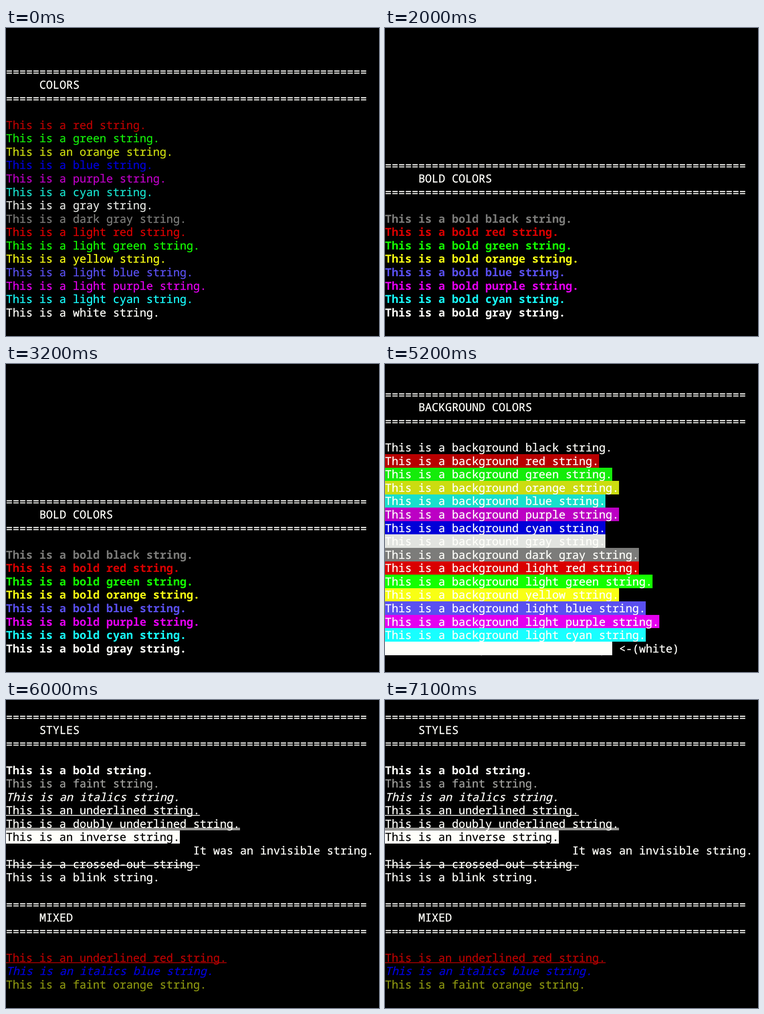
Write an HTML page that moves like this. It is 824 px wide and 680 px high and loops after 7700 ms.

```html
<!DOCTYPE html>
<html lang="en">
<head>
<meta charset="utf-8">
<title>Terminal text styles</title>
<style>
  html, body { margin: 0; width: 100%; height: 100%; overflow: hidden; background: #000; }
  svg { display: block; width: 824px; height: 680px; }
  text {
    font: 24.617px "Noto Sans Mono", "DejaVu Sans Mono", monospace;
    text-rendering: geometricPrecision;
    white-space: pre;
    fill: currentColor;
    stroke: currentColor;
    stroke-width: .35px;
  }
  .bold { font-weight: 700; stroke: none; }
  .italic { font-style: italic; }
  .screen, .blink { animation: 7.7s step-end infinite; }
  #colors { animation-name: colors; }
  #bold { animation-name: bold; }
  #backs { animation-name: backs; }
  #styles { animation-name: styles; }
  .blink { animation-name: blink; }
  /* switches at 2 s, 4 s and 6 s; the blink gap runs from 7 s to 7.1 s */
  @keyframes colors { 0% { opacity: 1 } 25.974%, 100% { opacity: 0 } }
  @keyframes bold { 0% { opacity: 0 } 25.974% { opacity: 1 } 51.948%, 100% { opacity: 0 } }
  @keyframes backs { 0% { opacity: 0 } 51.948% { opacity: 1 } 77.922%, 100% { opacity: 0 } }
  @keyframes styles { 0% { opacity: 0 } 77.922%, 100% { opacity: 1 } }
  @keyframes blink { 0% { opacity: 1 } 90.909% { opacity: 0 } 92.2078%, 100% { opacity: 1 } }
</style>
</head>
<body>
<svg viewBox="0 0 824 680">
  <g class="screen" id="colors"></g>
  <g class="screen" id="bold"></g>
  <g class="screen" id="backs"></g>
  <g class="screen" id="styles"></g>
</svg>
<script>
const CELL = 14.77, ROW = 29.57, TOP = 21.6;
const BASE = 23.7, RULE_BASE = 25.5;
const UNDER = [25.3], DOUBLE = [24.3, 27.3], STRIKE = [17.3];
const WHITE = '#fffffa';
const palette = {
  black: '#000000', red: '#b80000', green: '#14ec0a', orange: '#ccdc10',
  blue: '#0000d8', purple: '#bc00c4', cyan: '#18e0cc', gray: '#e2e4e0',
  'dark gray': '#7c7c7a', 'light red': '#da0000', 'light green': '#14ff00',
  yellow: '#f8ff14', 'light blue': '#5a50f0', 'light purple': '#e400f0',
  'light cyan': '#18ffff', white: WHITE
};
const names = Object.keys(palette);

function add(parent, tag, attrs) {
  const el = document.createElementNS('http://www.w3.org/2000/svg', tag);
  for (const key in attrs) el.setAttribute(key, attrs[key]);
  return parent.appendChild(el);
}

const rowTop = row => TOP + row * ROW;

function print(g, row, str, { color = WHITE, col = 0, cls = '', back, lines = [], base = BASE } = {}) {
  const width = str.length * CELL;
  if (back) {
    const y = Math.round(rowTop(row));
    add(g, 'rect', { x: 0, y, width: Math.round(width), height: Math.round(rowTop(row + 1)) - y, fill: back });
  }
  add(g, 'text', { x: col * CELL, y: rowTop(row) + base, color, class: cls }).textContent = str;
  for (const dy of lines) {
    add(g, 'rect', { x: 0, y: rowTop(row) + dy, width, height: 1.7, fill: color });
  }
}

function heading(g, row, title) {
  for (const r of [row, row + 2]) print(g, r, '='.repeat(54), { base: RULE_BASE });
  print(g, row + 1, title, { col: 5 });
}

const screen = id => document.getElementById(id);
const article = word => /^[aeiou]/.test(word) ? 'an' : 'a';
const sentence = what => `This is ${article(what)} ${what} string.`;

let g = screen('colors');
heading(g, 2, 'COLORS');
names.slice(1).forEach((name, i) => print(g, 6 + i, sentence(name), { color: palette[name] }));

g = screen('bold');
heading(g, 9, 'BOLD COLORS');
names.slice(0, 8).forEach((name, i) =>
  print(g, 13 + i, sentence('bold ' + name), { cls: 'bold', color: palette[names[i + 8]] }));

g = screen('backs');
heading(g, 1, 'BACKGROUND COLORS');
const swapped = { blue: 'cyan', cyan: 'blue' };
names.forEach((name, i) =>
  print(g, 5 + i, sentence('background ' + name), { back: palette[swapped[name] || name] }));
print(g, 20, '<-(white)', { col: 35 });

g = screen('styles');
heading(g, 0, 'STYLES');
[
  ['bold', { cls: 'bold' }],
  ['faint', { color: '#a2a29f' }],
  ['italics', { cls: 'italic' }],
  ['underlined', { lines: UNDER }],
  ['doubly underlined', { lines: DOUBLE }],
  ['inverse', { color: '#000', back: WHITE }],
  null,
  ['crossed-out', { lines: STRIKE }],
  ['blink', { cls: 'blink' }]
].forEach((item, i) => item && print(g, 4 + i, sentence(item[0]), item[1]));
print(g, 10, 'It was an invisible string.', { col: 28 });

heading(g, 14, 'MIXED');
print(g, 18, sentence('underlined red'), { color: palette.red, lines: UNDER });
print(g, 19, sentence('italics blue'), { color: palette.blue, cls: 'italic' });
print(g, 20, sentence('faint orange'), { color: '#8a9410' });
</script>
</body>
</html>
```
